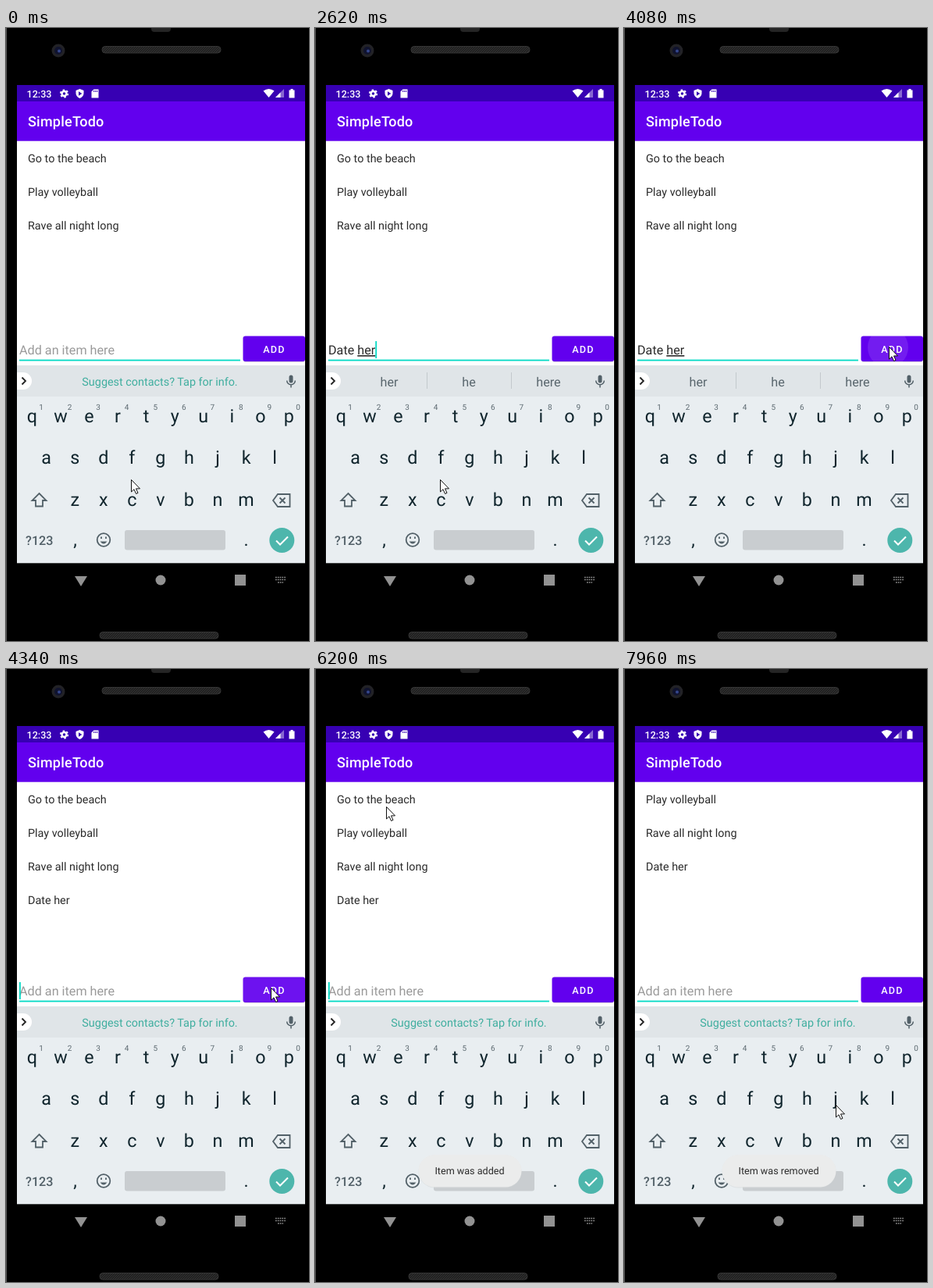
Animation, 388 px wide and 785 px high, one loop 8 s. Source, as an HTML page:

```html
<!DOCTYPE html>
<html lang="en">
<head>
<meta charset="utf-8">
<title>Todo app</title>
<style>
  html, body { margin: 0; width: 100%; height: 100%; overflow: hidden; background: #000; }
  svg { display: block; }
  text { font: 14.4px Roboto, sans-serif; white-space: pre; text-rendering: geometricPrecision; }
  .mid { text-anchor: middle; }
  .medium { font-weight: 500; fill: #fff; }
  .large { font-size: 16.2px; }
  .key { font-size: 23.3px; fill: #10252d; }
  .hint { font-size: 10px; fill: #5d6a71; }
  .icon { fill: none; stroke: #526068; stroke-width: 1.8; }
  #composing { text-decoration: underline; text-decoration-thickness: 1px; }
</style>
</head>
<body>
<svg width="388" height="785" viewBox="0 0 388 785">
  <defs>
    <pattern id="mesh" width="3" height="3" patternUnits="userSpaceOnUse">
      <rect width="3" height="3" fill="#202020"/>
      <path d="M0 3L3 0" stroke="#383838" stroke-width=".8"/>
    </pattern>
    <clipPath id="buttonClip"><rect x="303.5" y="394.5" width="79.5" height="32.5" rx="3"/></clipPath>
  </defs>

  <!-- Phone body -->
  <rect width="388" height="785"/>
  <path d="M.5 0V785" stroke="#5a5a5a"/>
  <rect x="186" y="-6" width="25" height="11" rx="4" fill="#252525"/>
  <circle cx="67" cy="29" r="8.5" fill="#222226"/>
  <circle cx="67" cy="29" r="5" fill="#10132e"/>
  <circle cx="68" cy="29.5" r="2" fill="#34468c"/>
  <g fill="url(#mesh)" stroke="#353535">
    <rect x="123" y="23.5" width="152" height="8.5" rx="4"/>
    <rect x="120" y="773.5" width="152" height="8.5" rx="4"/>
  </g>

  <!-- App -->
  <rect x="14" y="73" width="369" height="612" fill="#fff"/>
  <rect x="14" y="73" width="369" height="21" fill="#3700b3"/>
  <rect x="14" y="94" width="369" height="50.7" fill="#6200ee"/>
  <text x="26.5" y="88.5" class="medium" style="font-size:12.6px">12:33</text>
  <g fill="#fff">
    <circle cx="74.5" cy="84" r="3" fill="none" stroke="#fff" stroke-width="2.4"/>
    <circle cx="74.5" cy="84" r="4.8" fill="none" stroke="#fff" stroke-width="1.6" stroke-dasharray="2.5 2.53"/>
    <path d="M94.5 78L99.5 80V84Q99 88 94.5 90Q90 88 89.5 84V80Z"/>
    <path d="M93 81.2L97.3 84L93 86.8Z" fill="#3700b3"/>
    <path d="M112.5 78.5H118.5V89.5H109.5V81.5Z"/>
    <path d="M112.7 80v2m2-2v2m2-2v2" stroke="#3700b3"/>
    <path d="M329.5 80.5Q336.5 75.5 343.5 80.5L336.5 89Z"/>
    <path d="M356 78V89H345Z" opacity=".4"/>
    <path d="M351.5 82.5V89H345Z"/>
    <path d="M362.5 79.5H364.5V78H367.5V79.5H369.5V89.5H362.5Z"/>
  </g>
  <text x="28" y="126" class="medium" style="font-size:18px;letter-spacing:.0125em">SimpleTodo</text>
  <g id="list" fill="#2b2b2b"></g>

  <!-- Input row -->
  <rect x="17" y="424.6" width="283" height="1.8" fill="#03dac5"/>
  <text id="placeholder" x="17" y="418" class="large" fill="#9a9a9a">Add an item here</text>
  <text id="input" x="17" y="418" class="large" fill="#2b2b2b"><tspan id="typed"></tspan><tspan id="composing"></tspan></text>
  <rect id="caret" y="401" width="1.8" height="22" fill="#03dac5"/>
  <rect x="304" y="396" width="79" height="32" rx="3" fill="#ddd"/>
  <g clip-path="url(#buttonClip)">
    <rect x="303" y="394" width="80" height="34" fill="#6200ee"/>
    <circle id="ripple" cx="338" cy="409" fill="#fff"/>
  </g>
  <text x="329.3" y="415.6" class="medium" style="font-size:12.6px;letter-spacing:1.12px">ADD</text>

  <!-- Keyboard -->
  <rect x="14" y="432" width="369" height="253.3" fill="#e9eef1"/>
  <rect x="14" y="432" width="369" height="40" fill="#e0e5e8"/>
  <path d="M14 441H22A11 11 0 0 1 22 463H14Z" fill="#fff"/>
  <path d="M20.5 447.5L25 452L20.5 456.5" class="icon" style="stroke:#222"/>
  <text id="info" x="197" y="458" class="mid" fill="#3fae9f">Suggest contacts? Tap for info.</text>
  <g id="suggestions" fill="#59666d">
    <path d="M143.5 441V462M251.5 441V462" stroke="#c3c9cd"/>
    <text x="95" y="458.5" class="mid large"></text>
    <text x="197" y="458.5" class="mid large"></text>
    <text x="299" y="458.5" class="mid large"></text>
  </g>
  <rect x="362.5" y="444.5" width="5" height="10" rx="2.5" fill="#526068"/>
  <path d="M359.7 451.5A5.3 5.3 0 0 0 370.3 451.5M365 457V460.5" class="icon" style="stroke-width:1.5"/>
  <g id="keys"></g>
  <g class="icon">
    <path d="M42.5 596L51.5 605H47V612.5H38V605H33.5Z"/>
    <path d="M348 597H363.5V613H348L342 605Z"/>
    <path d="M350.5 601.5L357.5 608.5M357.5 601.5L350.5 608.5"/>
    <circle cx="125" cy="655.5" r="8.3"/>
    <path d="M120.5 657.5Q125 663.5 129.5 657.5Z" style="fill:#526068;stroke:none"/>
    <path d="M122 651.5v2.5M128 651.5v2.5"/>
  </g>
  <text x="25" y="661.5" class="large" style="font-weight:500" fill="#526068">?123</text>
  <rect x="152" y="643" width="129" height="25.5" rx="3" fill="#c9cdd0"/>
  <circle cx="353.3" cy="656" r="16" fill="#4db6ac"/>
  <path d="M346 656.5L351 661.5L361 651.5" class="icon" style="stroke:#fff;stroke-width:2"/>

  <!-- Navigation bar -->
  <g fill="#929292">
    <path d="M88 702H104L96 715Z"/>
    <circle cx="198" cy="707" r="6.5"/>
    <rect x="293" y="700" width="14" height="14"/>
    <path d="M345 703.5H358M345 706.5H358M348 710H355" fill="none" stroke="#929292" stroke-width="1.7" stroke-dasharray="1.7 1.1"/>
  </g>

  <g id="toast">
    <rect y="622.5" height="42" rx="21" fill="#cfd3d5" opacity=".5"/>
    <rect y="622" height="41.5" rx="20.75" fill="#ebecec"/>
    <text x="198" y="647" class="mid" style="font-size:12.6px" fill="#2b2b2b"></text>
  </g>
  <path id="cursor" d="M.5 .5V16L4 12.8L6.6 18.5L9 17.4L6.5 11.9H11.5Z" fill="#fff" stroke="#111"/>
</svg>
<script>
const DURATION = 8000;
const $ = id => document.getElementById(id);
const label = (cls, x, y, text) => `<text class="mid ${cls}" x="${x}" y="${y}">${text}</text>`;

const KEY_PITCH = 36.55;
const keyRow = (letters, x, y) =>
  [...letters].map((c, i) => label("key", x + i * KEY_PITCH, y, c)).join("");
$("keys").innerHTML =
  keyRow("qwertyuiop", 33.4, 505.2) + keyRow("asdfghjkl", 51.7, 558.4) + keyRow("zxcvbnm", 88.2, 611.6) +
  [..."1234567890"].map((c, i) => label("hint", 45 + i * KEY_PITCH, 488.5, c)).join("") +
  label("key", 88.5, 663, ",") + label("key", 307.5, 663, ".");

// Each track holds [start time, ...values]; values stay until the next entry.
const typing = [
  [0, "", "", ""],
  [530, "", "D", ""], [1050, "", "Da", ""], [1170, "", "Dat", ""],
  [1540, "", "Date", "Date Dates Dated"],
  [1820, "Date ", "", "and of for"],
  [2070, "Date ", "h", "he has how"],
  [2310, "Date ", "he", "he her here"],
  [2620, "Date ", "her", "her he here"],
  [4200, "", "", "her he here"],
  [4340, "", "", ""]
];
const caretToggles = [530, 3150, 3540, 4080, 4200, 4710, 5230, 5660, 6200, 6710, 7120, 7660];
const pointer = [
  [0, 160, 578], [3150, 194, 535], [3290, 248, 490], [3420, 300, 444], [3540, 328, 419],
  [3690, 335, 412], [3810, 339, 408], [5230, 245, 294], [5380, 176, 221], [5660, 125, 223],
  [5810, 113, 223], [5960, 103, 206], [6080, 95, 187], [6200, 91, 176], [6320, 90, 170],
  [6460, 88, 168], [7660, 88, 171], [7810, 250, 358], [7960, 271, 558]
];
const ripple = [[0, 0, 0], [4080, 26, .11], [4200, 48, .15], [4340, 60, .07], [4460, 0, 0]];
const toast = [
  [0, 0], [4460, .35], [4590, .75], [4710, 1], [6320, .65], [6460, .3], [6590, .1], [6710, 0],
  [7120, .4], [7270, .8], [7390, 1]
];
const items = ["Go to the beach", "Play volleyball", "Rave all night long", "Date her"];

const valuesAt = (track, t) => track.findLast(entry => entry[0] <= t).slice(1);

function setAttrs(el, attrs) {
  for (const name in attrs) el.setAttribute(name, attrs[name]);
}

function drawInput(t) {
  const [typed, composing, words] = valuesAt(typing, t);
  $("typed").textContent = typed;
  $("composing").textContent = composing;
  $("placeholder").style.display = typed + composing ? "none" : "";
  $("info").style.display = words ? "none" : "";
  $("suggestions").style.display = words ? "" : "none";
  const list = words.split(" ");
  $("suggestions").querySelectorAll("text").forEach((el, i) => el.textContent = list[i] || "");

  const caretOn = caretToggles.filter(time => time <= t).length % 2;
  const width = typed + composing ? $("input").getComputedTextLength() : 0;
  setAttrs($("caret"), { x: 17 + width, opacity: caretOn });
}

function drawToast(t) {
  const removed = t >= 7120;
  const width = removed ? 146 : 132;
  $("toast").setAttribute("opacity", valuesAt(toast, t)[0]);
  $("toast").querySelectorAll("rect").forEach(el => setAttrs(el, { x: 198.5 - width / 2, width }));
  $("toast").querySelector("text").textContent = removed ? "Item was removed" : "Item was added";
}

function draw(t) {
  const visible = items.slice(t >= 7120 ? 1 : 0, t >= 4340 ? 4 : 3);
  $("list").innerHTML = visible.map((item, i) => `<text x="28" y="${171.5 + 43 * i}">${item}</text>`).join("");
  drawInput(t);
  drawToast(t);
  const [r, opacity] = valuesAt(ripple, t);
  setAttrs($("ripple"), { r, opacity });
  $("cursor").setAttribute("transform", `translate(${valuesAt(pointer, t)})`);
}

const start = performance.now();
function tick() {
  draw((performance.now() - start) % DURATION);
  requestAnimationFrame(tick);
}
tick();
</script>
</body>
</html>
```
